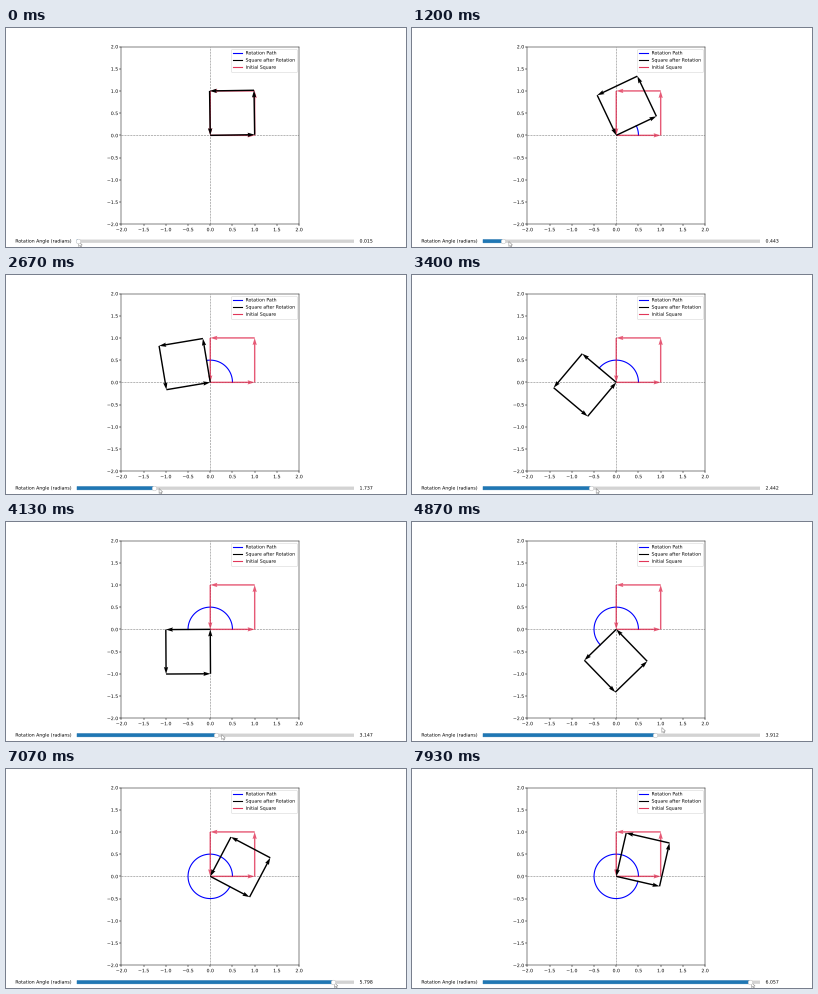
Write a matplotlib script that moves like this. It is 400x219 px and loops after 8000 ms.

```python
import numpy as np
import matplotlib.pyplot as plt
from matplotlib.animation import FuncAnimation
from matplotlib.patches import Polygon, Rectangle
from matplotlib.patheffects import Normal
from matplotlib.text import Text

W, H, DPI = 400, 219, 100
FRAMES, INTERVAL = 200, 40
STEP = 1 / 15  # seconds between updates of the picture
S = 1 / 3      # default-styled figure at one third size

plt.rcParams.update({
    "font.family": "DejaVu Sans",
    "font.size": 10 * S,
    "text.hinting": "none",
    "axes.linewidth": 0.35,
    "patch.linewidth": 0.4,
    "xtick.major.size": 3.5 * S, "ytick.major.size": 3.5 * S,
    "xtick.major.pad": 3.5 * S, "ytick.major.pad": 3.5 * S,
    "xtick.major.width": 0.35, "ytick.major.width": 0.35,
})

# key points of the drag: (seconds, radians)
DRAG = [(0, 0.015), (0.87, 0.165), (1.2, 0.443), (1.73, 1.03), (2.667, 1.737),
        (4.133, 3.147), (4.867, 3.912), (6.067, 5.256), (6.93, 5.757),
        (7.933, 6.057), (8.1, 6.1)]
LEAD = 0.13  # the pointer runs ahead of the redrawn knob

TRACK_X, TRACK_W, TRACK_Y, TRACK_H = 71.0, 277.0, 213.2, 3.3
POINTER = np.array([(0, 0), (0, 5), (1.2, 4), (2, 5.6), (2.8, 5.2), (2.1, 3.6),
                    (3.6, 3.5)])

fig = plt.figure(figsize=(W / DPI, H / DPI), dpi=DPI, facecolor="white")


def angle(t):
    return np.interp(t, *zip(*DRAG))


def slider_x(theta):
    return TRACK_X + TRACK_W * theta / (2 * np.pi)


def square(theta):
    """Corners and edge vectors of the unit square turned by theta."""
    c, s = np.cos(theta), np.sin(theta)
    e1, e2 = np.array([c, s]), np.array([-s, c])
    return np.array([0 * e1, e1, e1 + e2, e2]), np.array([e1, e2, -e1, -e2])


def arrows(theta, **style):
    pos, vec = square(theta)
    return ax.quiver(*pos.T, *vec.T, angles="xy", scale_units="xy", scale=1,
                     units="width", width=0.008, **style)


def line(label, color, **style):
    return ax.plot([], [], color=color, lw=0.8, label=label, **style)[0]


# plot
left, top, side = 115.4, 18.5, 177.7
ax = fig.add_axes([left / W, 1 - (top + side) / H, side / W, side / H])
ax.set(xlim=(-2, 2), ylim=(-2, 2),
       xticks=np.arange(-2, 2.1, 0.5), yticks=np.arange(-2, 2.1, 0.5))
for draw in (ax.axhline, ax.axvline):
    draw(0, color="gray", ls="--", lw=0.4, zorder=1)

arrows(0, color="crimson", alpha=0.7, zorder=3)
turned = arrows(0, color="black", zorder=4)
arc = line("Rotation Path", "blue", zorder=2.5)
line("Square after Rotation", "black")
line("Initial Square", "crimson", alpha=0.85)
ax.legend(loc="upper right").set_zorder(5)

# slider and pointer, in pixel coordinates
ui = fig.add_axes([0, 0, 1, 1])
ui.set(xlim=(0, W), ylim=(H, 0))
ui.axis("off")


def bar(width, color, edge):
    return ui.add_patch(Rectangle((TRACK_X, TRACK_Y - TRACK_H / 2), width, TRACK_H,
                                  color=color, lw=edge, snap=False))


bar(TRACK_W, "lightgrey", 0)
fill = bar(0, "tab:blue", S)
knob, = ui.plot([], [], "o", ms=10 * S, mfc="white", mec="0.75", mew=S)
knob.set_snap(False)
pointer = ui.add_patch(Polygon(POINTER, fc="white", ec="0.5", lw=0.35))
ui.text(TRACK_X - 0.02 * TRACK_W, TRACK_Y, "Rotation Angle (radians)",
        ha="right", va="center")
value = ui.text(TRACK_X + 1.02 * TRACK_W, TRACK_Y, "", ha="left", va="center")

# draw text as outlines so that small glyphs keep exact spacing
for label in fig.findobj(Text):
    label.set_path_effects([Normal()])


def update(i):
    t = STEP * np.floor((i * INTERVAL / 1000 + STEP / 2) / STEP)
    theta = angle(t)

    pos, vec = square(theta)
    turned.set_offsets(pos)
    turned.set_UVC(*vec.T)
    a = np.linspace(0, theta, 100)
    arc.set_data(0.5 * np.cos(a), 0.5 * np.sin(a))

    fill.set_width(slider_x(theta) - TRACK_X)
    knob.set_data([slider_x(theta)], [TRACK_Y])
    value.set_text(f"{theta:.3f}")

    # the hand drifts up and back once during the drag
    lift = 10 * np.exp(-((t - 5.2) / 0.7) ** 2)
    pointer.set_xy(POINTER + [slider_x(angle(t + LEAD)), 213.5 - lift])
    return turned, arc, fill, knob, value, pointer


anim = FuncAnimation(fig, update, frames=FRAMES, interval=INTERVAL,
                     init_func=lambda: update(0), repeat=True, repeat_delay=0,
                     blit=False)
plt.show()
```
